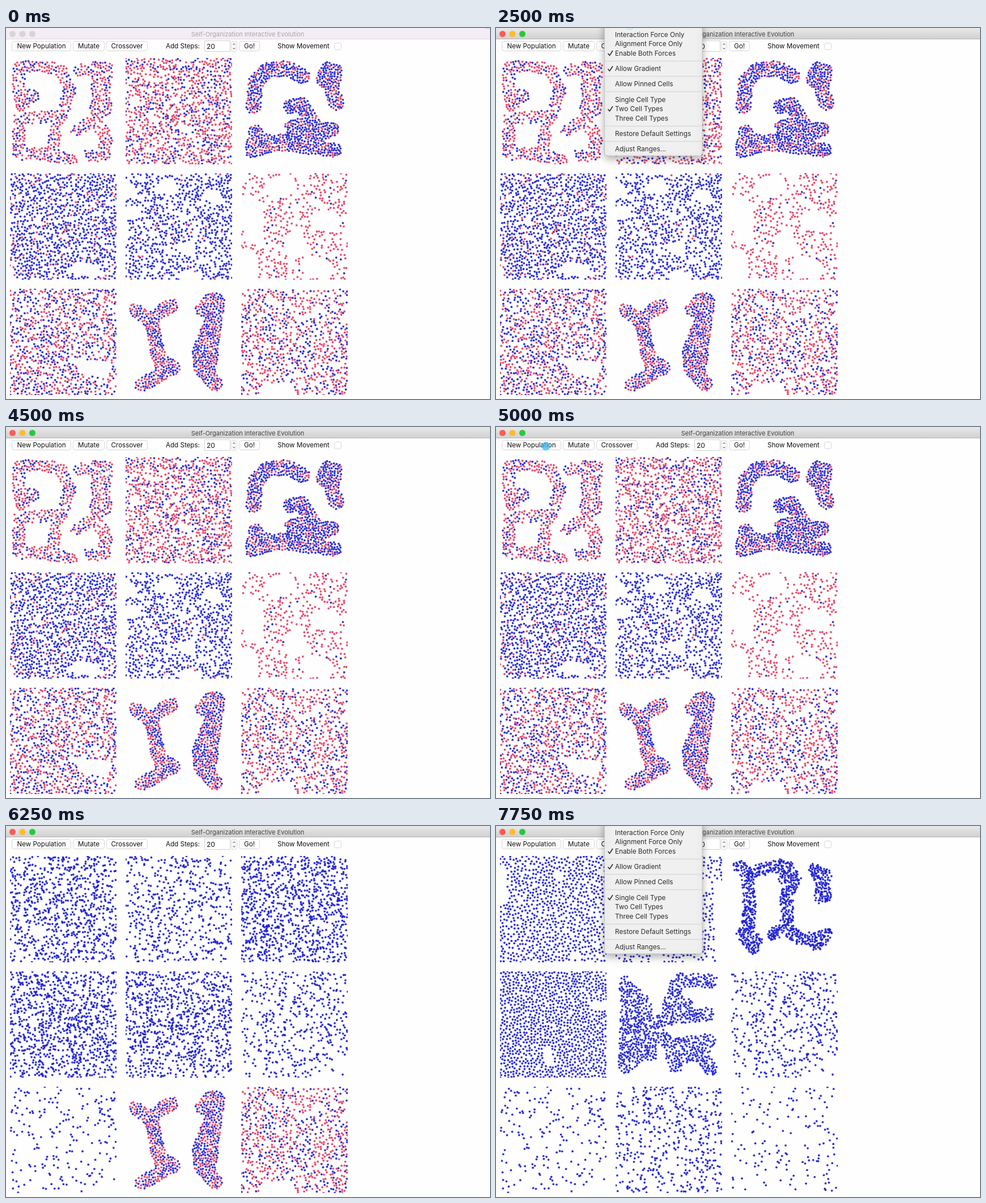
An HTML page with a canvas for the animation above (8 s loop, 854x656 px).

```html
<!DOCTYPE html>
<html lang="en">
<head>
<meta charset="utf-8">
<title>Self-Organization Interactive Evolution</title>
<style>
  html, body { margin: 0; width: 100%; height: 100%; overflow: hidden; background: #fefefe; }
  canvas { display: block; }
</style>
</head>
<body>
<canvas id="stage" width="854" height="656"></canvas>
<script>
const ctx = document.getElementById('stage').getContext('2d');
const LOOP = 8000, STEP = 250, TILE = 188, PITCH = 204;
const FONT = 'Inter, Roboto, sans-serif';
const BLUE = 'rgba(14,18,206,.86)', RED = 'rgba(222,36,78,.8)';

function seededRandom(seed) {
  return () => {
    seed = (seed + 0x6D2B79F5) | 0;
    let r = Math.imul(seed ^ (seed >>> 15), 1 | seed);
    r = (r + Math.imul(r ^ (r >>> 7), 61 | r)) ^ r;
    return ((r ^ (r >>> 14)) >>> 0) / 4294967296;
  };
}

// Scatter cells along thick paths ("body") or everywhere except along them ("voids").
function makeTile(seed, { n, blue = 1, gap = 2, body, voids, width = 26 }) {
  const canvas = document.createElement('canvas');
  canvas.width = canvas.height = TILE;
  const g = canvas.getContext('2d');
  const path = new Path2D(body || voids || '');
  const random = seededRandom(seed * 977);
  const cells = [];
  g.lineWidth = width;
  g.lineCap = g.lineJoin = 'round';
  for (let tries = 0; cells.length < n && tries < 20000; tries++) {
    const x = random() * TILE, y = random() * TILE;
    if (body && !g.isPointInStroke(path, x, y)) continue;
    if (voids && g.isPointInStroke(path, x, y)) continue;
    if (cells.some(c => (c.x - x) ** 2 + (c.y - y) ** 2 < gap * gap)) continue;
    cells.push({ x, y });
  }
  for (const { x, y } of cells) {
    g.fillStyle = random() < blue ? BLUE : RED;
    g.beginPath();
    g.arc(x, y, 1.9, 0, 7);
    g.fill();
  }
  return canvas;
}

const mixed = [
  { n: 640, blue: .36, gap: 3.6, width: 22,
    body: 'M16 16L60 14L90 22L106 55L93 100L60 105L16 108L16 170L60 170L108 180M82 115L76 165M16 16L16 70L44 64L18 84M124 22L150 16L172 20L164 55L170 90L118 128M156 30L152 90M152 112L170 140L165 172L140 172' },
  { n: 930, blue: .33, gap: 3.2, width: 14, voids: 'M42 102L46 106M100 122L110 126M12 76L18 80' },
  { n: 860, blue: .73, gap: 3.3,
    body: 'M22 86L26 42L45 22L80 18L108 32M145 40L152 20L165 22L160 55L168 80M88 86L106 82L120 105M26 132L20 164L60 150L110 140L160 125M90 122L120 115L150 130M30 145L100 155L164 162' },
  { n: 930, blue: .87, gap: 3.2, width: 22, voids: 'M120 168L150 174' },
  { n: 720, blue: .96, gap: 3.2, width: 22, voids: 'M0 20L8 34M148 38L162 46M70 22L84 28M102 132L112 136M110 180L122 186M4 72L18 70' },
  { n: 360, blue: .06, gap: 3.6, width: 34, voids: 'M18 58L24 106M58 24L80 18M92 118L98 132M140 82L158 88M122 164L140 170M10 150L14 178' },
  { n: 830, blue: .5, gap: 3.3, width: 26, voids: 'M132 138L164 142' },
  { n: 620, blue: .56, gap: 3.5, width: 25,
    body: 'M18 39L42 54L52 88L60 126L84 140L28 170M42 54L80 30M56 112L68 148M136 36L150 20L162 20L160 40L142 82L130 112L134 142L158 168M158 52L148 140' },
  { n: 720, blue: .4, gap: 3.3, width: 26, voids: 'M44 182L80 176' }
];

const newborn = [760, 500, 900, 900, 820, 430, 200, 450, 150].map(n => ({ n }));

const settled = [
  { n: 770, gap: 4.4, width: 14, voids: 'M4 20L8 80M100 30L106 38M130 174L136 178' },
  { n: 500, gap: 4.3, width: 22, voids: 'M8 4L120 2M80 28L118 28M182 52L187 188M150 50L158 52M70 170L74 186M42 60L50 66' },
  { n: 840, gap: 2, width: 23,
    body: 'M14 18L30 30L32 90L28 148L44 148M20 136L38 162M30 30L85 17L112 38L98 70L98 130L120 145L160 148M74 138L100 128M100 20L94 40M148 22L160 44L166 70M166 34L158 74M150 156L166 138' },
  { n: 1010, gap: 4.2, width: 18, voids: 'M84 142L86 160M166 60L182 62' },
  { n: 860, gap: 2.8, width: 24,
    body: 'M18 20L22 60L18 130L16 168M28 34L50 55L60 110L62 146M34 70L42 140M94 62L112 15L168 17M100 50L126 60M84 84L162 76M70 100L95 132L164 122L150 148L100 150L106 168M150 148L168 172M18 168L50 140' }
];

const bornAt = [5250, 5500, 5500, 5750, 6000, 6000, 6250, 6500, 6500];
const settledAt = [6750, 7000, 7250, 7500, 7750];
const tiles = mixed.map((spec, i) => {
  const phases = [{ at: 0, image: makeTile(i + 1, spec) },
                  { at: bornAt[i], image: makeTile(i + 21, newborn[i]) }];
  if (settled[i]) phases.push({ at: settledAt[i], image: makeTile(i + 41, settled[i]) });
  return phases;
});

const menu = [
  ['Interaction Force Only', 11.5], ['Alignment Force Only', 28], ['Enable Both Forces', 44.5],
  ['Allow Gradient', 72], ['Allow Pinned Cells', 99], ['Single Cell Type', 126.5],
  ['Two Cell Types', 143], ['Three Cell Types', 159.5], ['Restore Default Settings', 187],
  ['Adjust Ranges...', 214]
];

// Pointer path: time, x, y
const pointerPath = [
  [0, 851, -7], [250, 851, -7], [500, 820, 20], [750, 751, 57], [1000, 751, 57], [1250, 745, 76],
  [2000, 270, 6], [2250, 238, -10], [2500, 236, -6], [3500, 261, 129], [4250, 261, 129],
  [4750, 88, 34], [5500, 88, 34], [5750, 110, -14], [6500, 220, -9], [7000, 238, -7], [7250, 238, -12], [8000, 238, -12]
];

function pointerAt(t) {
  const i = pointerPath.findIndex(key => key[0] > t);
  const [t0, x0, y0] = pointerPath[i - 1], [t1, x1, y1] = pointerPath[i];
  const k = (t - t0) / (t1 - t0);
  return { x: x0 + (x1 - x0) * k, y: y0 + (y1 - y0) * k };
}

function text(label, x, y, size = 11.6, color = '#111', align = 'left') {
  ctx.font = `${size}px ${FONT}`;
  ctx.fillStyle = color;
  ctx.textAlign = align;
  ctx.textBaseline = 'alphabetic';
  ctx.fillText(label, x, y + size * .36);
}

function box(x, y, w, h, radius, fill = '#fff', stroke = '#d6d6d6') {
  ctx.beginPath();
  ctx.roundRect(x, y, w, h, radius);
  ctx.fillStyle = fill;
  ctx.fill();
  ctx.lineWidth = 1;
  ctx.strokeStyle = stroke;
  ctx.stroke();
}

function line(points, color, width = 1) {
  ctx.beginPath();
  points.forEach(([x, y]) => ctx.lineTo(x, y));
  ctx.strokeStyle = color;
  ctx.lineWidth = width;
  ctx.stroke();
}

function disc(x, y, r, color) {
  ctx.beginPath();
  ctx.arc(x, y, r, 0, 7);
  ctx.fillStyle = color;
  ctx.fill();
}

function button(label, x, w) {
  box(x + .5, 23.5, w, 17, 4);
  text(label, x + .5 + w / 2, 32, 11.6, '#111', 'center');
}

function drawTitleBar(active) {
  const shade = ctx.createLinearGradient(0, 0, 0, 20);
  shade.addColorStop(0, active ? '#e8e8e8' : '#f6eef6');
  shade.addColorStop(1, active ? '#d0d0d0' : '#f4ecf4');
  ctx.fillStyle = shade;
  ctx.fillRect(0, 0, 854, 20);
  line([[0, 19.5], [854, 19.5]], active ? '#b4b4b4' : '#dcd4dc');
  ['#fc5b57', '#fdbc2e', '#28c840'].forEach((color, i) =>
    disc(11.5 + 17.5 * i, 10.5, 5.5, active ? color : '#d9d4d9'));
  text('Self-Organization Interactive Evolution', 426.5, 11, 11, active ? '#444' : '#aaa5aa', 'center');
}

function drawToolbar() {
  button('New Population', 10, 104);
  button('Mutate', 118, 55);
  button('Crossover', 177, 72);
  text('Add Steps:', 282, 32);
  box(350.5, 22.5, 45, 19, 0, '#fff', '#cfcfcf');
  text('20', 354, 33, 12);
  box(397.5, 23.5, 10, 18, 4);
  line([[400.5, 30], [402.5, 27.5], [404.5, 30]], '#444');
  line([[400.5, 35], [402.5, 37.5], [404.5, 35]], '#444');
  button('Go!', 411, 36);
  text('Show Movement', 479, 32);
  box(579.5, 26.5, 12, 12, 3);
}

function drawMenu(pointer, cellType) {
  ctx.save();
  ctx.shadowColor = 'rgba(0,0,0,.3)';
  ctx.shadowBlur = 14;
  ctx.shadowOffsetY = 5;
  box(191.5, -20, 172.5, 246, 5, '#f0f0f0', '#c4c4c4');
  ctx.restore();
  for (const y of [58.5, 85.5, 112.5, 173.5, 200.5]) line([[192, y], [364, y]], '#d9d9d9', 1.5);
  const checked = ['Enable Both Forces', 'Allow Gradient', cellType];
  for (const [label, y] of menu) {
    const hot = Math.abs(pointer.y - y) < 8.3;
    const color = hot ? '#fff' : '#2b2b2b';
    if (hot) {
      ctx.fillStyle = '#0b5cd7';
      ctx.fillRect(192, y - 8.5, 172, 16.5);
    }
    text(label, 210, y, 11.75, color);
    if (checked.includes(label)) line([[197.5, y + .5], [200.5, y + 4], [206, y - 4.5]], color, 1.6);
  }
}

function drawPointer({ x, y }, pressed) {
  if (pressed) return disc(x, y, 7.5, 'rgba(56,186,240,.75)');
  ctx.beginPath();
  ctx.arc(x, y, 8.5, 0, 7);
  ctx.strokeStyle = '#b4e6f4';
  ctx.lineWidth = 1.4;
  ctx.stroke();
}

function draw(now) {
  const t = Math.floor((now % LOOP) / STEP) * STEP;
  const pointer = pointerAt(t);
  ctx.fillStyle = '#fefefe';
  ctx.fillRect(0, 0, 854, 656);
  drawTitleBar(t >= 1250);
  drawToolbar();
  tiles.forEach((phases, i) => {
    const { image } = phases.filter(phase => phase.at <= t).pop();
    ctx.drawImage(image, 7 + PITCH * (i % 3), 53 + PITCH * Math.floor(i / 3));
  });
  if ((t >= 2500 && t < 4250) || t >= 7500) {
    drawMenu(pointer, t < 4250 ? 'Two Cell Types' : 'Single Cell Type');
  }
  drawPointer(pointer, (t >= 3750 && t < 4250) || t === 5000);
}

const start = performance.now();
function tick() {
  draw(performance.now() - start);
  requestAnimationFrame(tick);
}
tick();
</script>
</body>
</html>
```
